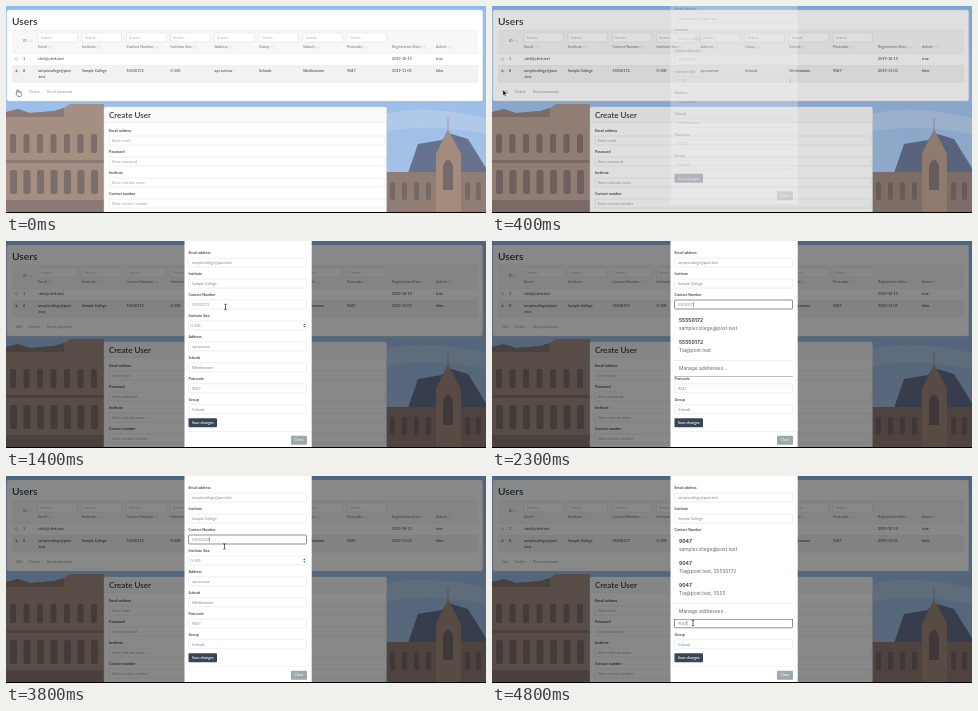
Write an HTML page that moves like this. It is 480 by 207 pixels and loops after 5000 ms.

```html
<!DOCTYPE html>
<html lang="en">
<head>
<meta charset="utf-8">
<title>User administration</title>
<style>
  html, body { margin: 0; width: 100%; height: 100%; overflow: hidden; }
  svg { display: block; width: 100vw; height: 100vh; font-family: Lato, sans-serif; }
  .menu { font-family: Inter, sans-serif; }
</style>
</head>
<body>
<svg id="stage" viewBox="0 0 480 207" preserveAspectRatio="none"></svg>
<script>
const INK = '#33383d', GREY = '#7b8a8b', LINK = '#86a0ae', LINE = '#dee2e6', EDGE = '#ced4da';
const EMAIL = 'samplecollege@post.test', PHONE = '55550172', FRIEND = 'Tia@post.test', POSTCODE = '9047';

const attrs = o => Object.entries(o).map(([k, v]) => `${k}="${v}"`).join(' ');
const rect = (x, y, width, height, fill, more = {}) =>
  `<rect ${attrs({ x, y, width, height, fill, ...more })}/>`;
const path = (d, fill, more = {}) => `<path ${attrs({ d, fill, ...more })}/>`;
// y is the middle of the line of text
const text = (x, y, s, fill = INK, size = 3.7, more = {}) =>
  `<text ${attrs({ x, y: y + size * .35, fill, 'font-size': size, ...more })}>${s}</text>`;
const bold = (x, y, s, fill = INK, size = 3.7) => text(x, y, s, fill, size, { 'font-weight': 600 });
const box = (x, y, w, h = 9, more = {}) =>
  rect(x, y, w, h, '#fff', { stroke: EDGE, 'stroke-width': .4, rx: 1, ...more });
const rule = (x, y, w) => rect(x, y, w, .4, LINE);

function scenery() {
  let s = rect(0, 0, 480, 207, 'url(#sky)');
  s += path('M380 108Q420 98 480 112V128Q420 116 380 126Z', '#c3d4ea', { opacity: .5 });
  s += path('M0 106L12 103 24 107 48 105 58 102 64 98H98V207H0Z', '#a58f83');
  s += path('M0 106L12 103 24 107 48 105 58 102V111H0ZM0 154H98V157H0ZM0 194H98V207H0Z', '#8b7a74');
  for (let i = 0; i < 7; i++) {
    const x = 4 + i * 13.5;
    s += rect(x, 128, 6, 19, '#7c6e6a', { rx: 2 }) + rect(x, 164, 7, 24, '#7c6e6a', { rx: 2 });
  }
  s += path('M402 167L412 138 436 134 442 127 462 133 480 162V170H402Z', '#66728e');
  s += path('M380 166H480V207H380Z', '#917d73');
  s += path('M430 207V148L441.6 124V112H442.4V124L455 148V207Z', '#a38c7e');
  s += path('M437 184V160Q442 147 447 160V184Z', '#75696a');
  for (let i = 0; i < 4; i++) s += rect(384 + i * 12, 176, 5, 18, '#756865', { rx: 2 });
  return s + rect(459, 176, 5, 18, '#756865', { rx: 2 }) + rect(470, 176, 5, 18, '#756865', { rx: 2 });
}

function usersPanel() {
  const cols = [32, 76, 120.5, 164.5, 208.5, 253, 297, 341, 386, 430];
  const heads = ['Email', 'Institute', 'Contact Number', 'Institute Size', 'Address',
    'Group', 'Suburb', 'Postcode', 'Registration Date', 'Admin'];
  const rows = [
    [53, '1', 'clerk@clerk.test', '', '', '', '', '', '', '', '2019-10-15', 'true'],
    [65, '8', 'samplecollege@post', 'Sample College', PHONE, '0-100', 'xyz avenue',
      'Schools', 'Wattlemoore', POSTCODE, '2019-11-01', 'false']];
  const arrows = '<tspan fill="#b9bec2" font-size="3" font-weight="400"> ↑↓</tspan>';
  let s = rect(.8, 4, 476, 91, '#fff', { rx: 2, stroke: '#d5dae0', 'stroke-width': .5 });
  s += bold(6, 15.2, 'Users', INK, 10.2);
  s += rect(6, 24, 466, 23.3, '#f7f7f7') + rect(6, 59.5, 466, 16.5, '#f2f2f2');
  for (const y of [24, 47.3, 59.3, 76]) s += rule(6, y, 466);
  s += bold(17, 35, 'ID' + arrows, GREY);
  heads.forEach((h, i) => {
    const x = cols[i];
    if (i < 8) s += box(x, 27, 39.5) + text(x + 2.8, 31.5, 'Search...', '#a9afb5', 3.4);
    s += bold(x, 41, h + arrows, GREY);
  });
  for (const [y, id, ...cells] of rows) {
    s += `<circle cx="10.5" cy="${y}" r="1.3" fill="#fff" stroke="#999" stroke-width=".4"/>`;
    s += text(17, y, id) + cells.map((c, i) => text(cols[i], y, c)).join('');
  }
  s += '<circle cx="10.5" cy="65" r=".7" fill="#555"/>' + text(32, 70.8, '.test');
  return s + text(10, 85.5, 'Edit', LINK) + text(23, 85.5, 'Delete', LINK) + text(41, 85.5, 'Reset password', LINK);
}

function createPanel() {
  let s = rect(98, 101, 282.5, 110, '#fff', { rx: 2, stroke: '#d5dae0', 'stroke-width': .5 });
  s += rect(98.3, 101.3, 282, 15.2, '#f9f9f9', { rx: 2 }) + rule(98, 116.4, 282.5);
  s += bold(103, 109.3, 'Create User', INK, 8);
  [['Email address', 'Enter email'], ['Password', 'Enter password'],
   ['Institute', 'Enter institute name'], ['Contact number', 'Enter contact number']
  ].forEach(([label, hint], i) => {
    const y = 125 + i * 21;
    s += bold(103, y, label) + box(103, y + 5, 276) + text(106, y + 9.6, hint, '#9aa3a8');
  });
  return s;
}

const fieldY = i => 21.6 + i * 20.95;

function editForm() {
  let s = rect(178.5, -8, 127.2, 215.5, '#fff', { rx: 1.2 });
  [['Email address', EMAIL], ['Institute', 'Sample College'], ['Contact Number', PHONE],
   ['Institute Size', '0-100'], ['Address', 'xyz avenue'], ['Suburb', 'Wattlemoore'],
   ['Postcode', POSTCODE], ['Group', 'Schools']
  ].forEach(([label, value], i) => {
    const y = fieldY(i), id = 'value' + i;
    s += bold(182.5, y - 9.5, label) + box(182.5, y - 4.5, 118, 9, { id: 'box' + i });
    s += text(i === 3 ? 184.5 : 186, y, value, GREY, 3.7, { id });
  });
  s += path('M297.3 84l1-1.6 1 1.6zM297.3 85l1 1.6 1-1.6z', '#444');
  s += rect(182.5, 177.2, 28.5, 9, '#384556', { rx: 1 });
  s += text(196.8, 181.7, 'Save changes', '#fff', 3.7, { 'text-anchor': 'middle', 'font-weight': 600 });
  s += rule(178.5, 190, 127.2) + rect(285, 194.7, 16, 9, '#9ca8a9', { rx: 1 });
  return s + text(293, 199.2, 'Close', '#fff', 3.7, { 'text-anchor': 'middle' });
}

function menu(id, top, title, lines) {
  const h = 22 * lines.length;
  let s = rect(182, top, 119, h + 22, '#fff', { filter: 'url(#shadow)' });
  lines.forEach((line, i) => {
    const y = top + 10 + 22 * i;
    s += text(187, y, title, '#444', 5, { 'font-weight': 700 }) + text(187, y + 8, line, '#666', 4.9);
  });
  s += rect(182, top + h + 6.3, 119, .5, '#ddd') + text(187, top + h + 14, 'Manage addresses...', '#666', 4.9);
  return `<g id="${id}" class="menu">${s}</g>`;
}

const stage = document.getElementById('stage');
stage.innerHTML = `<defs>
  <linearGradient id="sky" x2="0" y2="1">
    <stop stop-color="#8fbcf0"/><stop offset=".5" stop-color="#9dbfe8"/><stop offset="1" stop-color="#abc2e2"/>
  </linearGradient>
  <filter id="shadow"><feDropShadow dx="0" dy=".6" stdDeviation=".7" flood-opacity=".4"/></filter>
</defs>` + scenery() + usersPanel() + createPanel() +
  rect(0, 0, 480, 207, '#000', { id: 'shade' }) +
  `<g id="modal">${editForm()}` +
  menu('phones', 69, PHONE, [EMAIL, FRIEND]) +
  menu('postcodes', 55, POSTCODE, [EMAIL, `${FRIEND}, ${PHONE}`, `${FRIEND}, 5555`]) +
  rect(0, 0, .4, 5, '#222', { id: 'caret' }) + '</g><g id="pointer">' +
  path('M0 0Q.7-.8 1.3 0V2L4.2 2.6Q5 3 4.7 4.2L4 6.4H.8L-1.2 3.8Q-1.2 2.8 0 3.5Z', '#fff',
    { id: 'hand', stroke: '#333', 'stroke-width': .5 }) +
  path('M0 0V5.6L1.3 4.4 2.2 6.4 3.1 6 2.2 4.1H4Z', '#000', { id: 'arrow', stroke: '#fff', 'stroke-width': .4 }) +
  path('M-1.2-2.8Q0-2.8 0-2 0-2.8 1.2-2.8M0-2V2M-1.2 2.8Q0 2.8 0 2 0 2.8 1.2 2.8', 'none',
    { id: 'beam', stroke: '#111', 'stroke-width': .65 }) +
  '</g>' + rect(0, 206, 480, 1, '#000');

const el = id => document.getElementById(id);
const show = (id, on) => el(id).setAttribute('visibility', on ? 'visible' : 'hidden');
const clamp = v => Math.min(1, Math.max(0, v));
const ease = v => v * v * (3 - 2 * v);
const within = (t, ...spans) => spans.some(([a, b]) => t >= a && t < b);

function phoneAt(t) {
  if (t < 2300) return PHONE;
  if (t < 2600) return PHONE.slice(0, 7);
  return PHONE.slice(0, 6) + (t < 3400 ? '' : t < 3700 ? '2' : '22');
}

function focus(i, on) {
  el('box' + i).setAttribute('stroke', on ? '#6d7781' : EDGE);
  el('box' + i).setAttribute('stroke-width', on ? .8 : .4);
}

function draw(t) {
  const fade = clamp((t - 360) / 150), slide = clamp((t - 360) / 300);
  el('shade').setAttribute('opacity', fade * .465);
  el('modal').setAttribute('opacity', fade);
  el('modal').setAttribute('transform', `translate(0 ${-12.5 * (1 - slide) ** 2})`);

  el('value2').textContent = phoneAt(t);
  const field = t < 4700 ? 2 : 6;
  focus(2, within(t, [1700, 4700]));
  focus(6, t >= 4700);
  show('phones', within(t, [1700, 3400]));
  show('postcodes', t >= 4700);

  show('caret', within(t, [1700, 2100], [2300, 3200], [3400, 4200], [4700, 5000]));
  el('caret').setAttribute('x', 186.2 + el('value' + field).getComputedTextLength());
  el('caret').setAttribute('y', fieldY(field) - 2.5);

  const go = ease(clamp((t - 600) / 800)), down = ease(clamp((t - 3700) / 700));
  const x = 11 + 208.5 * go - 18.5 * down, y = 84 - 18 * go + 81 * down;
  const visible = !within(t, [2300, 3700]), overLink = t < 360;
  el('pointer').setAttribute('transform', `translate(${x} ${y})`);
  show('hand', overLink);
  show('arrow', visible && !overLink && x < 182);
  show('beam', visible && x >= 182);
}

const start = performance.now();
function tick() {
  draw(Math.floor((performance.now() - start) % 5000 / 100) * 100);
  requestAnimationFrame(tick);
}
tick();
</script>
</body>
</html>
```
